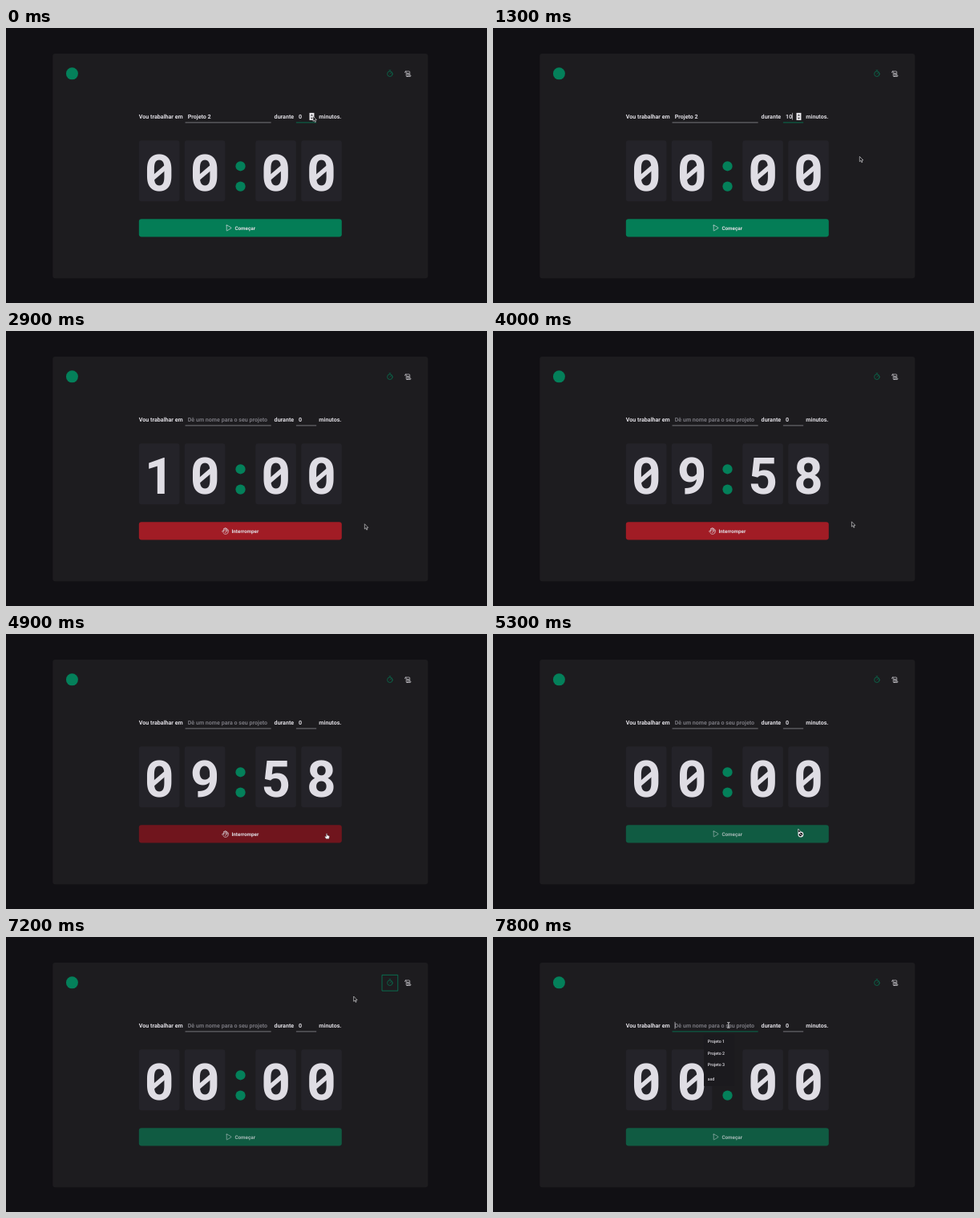
An HTML page that plays this animation: 600x343 px, repeating every 8000 ms.

```html
<!DOCTYPE html>
<html lang="pt-BR">
<head>
<meta charset="utf-8">
<title>Timer</title>
<style>
  html, body { margin: 0; width: 100%; height: 100%; overflow: hidden; background: #111014; }
  svg { display: block; width: 100%; height: 100%; }
  text { font-family: Roboto, Arial, sans-serif; white-space: pre; text-rendering: geometricPrecision; }
  .form { font-size: 18px; font-weight: 700; fill: #e0dee4; }
  .digit { font-size: 160px; font-weight: 700; fill: #dfdde4; text-anchor: middle; }
  .label { font-size: 16px; font-weight: 700; fill: #e0dee4; }
  .th { font-size: 14px; font-weight: 700; fill: #e0dee4; }
  .td { font-size: 14px; fill: #b9b7bf; }
  .option { font-size: 13.3px; font-weight: 500; fill: #e0dee4; }
  .icon { fill: none; stroke-width: 18; stroke-linecap: round; stroke-linejoin: round; }
  .hide { display: none; }
</style>
</head>
<body>
<svg viewBox="0 0 600 343">
  <rect width="600" height="343" fill="#111014"/>
  <!-- page layout in CSS pixels, scaled down to the stage -->
  <g transform="translate(58.3 31.95) scale(.3953)">
    <rect width="1184" height="709" rx="8" fill="#1d1c1f"/>
    <circle cx="61" cy="63" r="19" fill="#04805a"/>

    <g id="navTimer">
      <path class="frame" d="M1039 39h50v50h-50z" fill="none" stroke="#04805a" stroke-width="2"/>
      <path class="bar" d="M1040 85h48v3h-48z" fill="#04805a"/>
      <g class="icon" transform="translate(1052 52) scale(.09375)">
        <circle cx="128" cy="128" r="88"/><path d="M128 128L168 88M104 8h48"/>
      </g>
    </g>
    <g id="navHistory">
      <path class="frame" d="M1095 39h50v50h-50z" fill="none" stroke="#04805a" stroke-width="2"/>
      <path class="bar" d="M1096 85h48v3h-48z" fill="#04805a"/>
      <g class="icon" transform="translate(1108 52) scale(.09375)">
        <path d="M40 88A24 24 0 1 1 80 64V192a24 24 0 0 0 48 0q0-10-8-16H224q8 6 8 16a24 24 0 0 1-24 24H104M56 40H176a24 24 0 0 1 24 24V176M112 104h56M112 136h56"/>
      </g>
    </g>

    <g id="timerPage">
      <text class="form" x="272" y="205.500">Vou trabalhar em</text>
      <text class="form" x="699" y="205.500">durante</text>
      <text class="form" x="840" y="205.500">minutos.</text>
      <text class="form" x="426" y="205.500" id="task"></text>
      <text class="form" x="776" y="205.500" id="minutes"></text>
      <rect x="418" y="216.500" width="271" height="2" id="taskLine"/>
      <rect x="768" y="216.500" width="64" height="2" id="minutesLine"/>
      <rect y="187" width="1.6" height="22" fill="#e0dee4" id="caret"/>
      <g id="spinner">
        <rect x="810" y="187" width="15" height="23" fill="#e9e8ec"/>
        <path d="M813.500 196h8l-4-5zM813.500 202h8l-4 5z" fill="#3a393d"/>
      </g>
      <g id="cards"></g>
      <g fill="#04805a"><circle cx="592.500" cy="355" r="15.500"/><circle cx="592.500" cy="419" r="15.500"/></g>
      <rect x="272" y="522" width="640" height="56" rx="8" id="button"/>
      <g id="start">
        <path class="icon" stroke="#e0dee4" transform="translate(542 538) scale(.09375)" d="M72 40V216q2 10 12 7L228 135q6-7 0-14L84 33q-9-3-12 7Z"/>
        <text class="label" x="574.500" y="556">Começar</text>
      </g>
      <g id="stop">
        <path class="icon" stroke="#e0dee4" transform="translate(532 538) scale(.09375)" d="M76 128V64a20 20 0 0 1 40 0V44a20 20 0 0 1 40 0V64a20 20 0 0 1 40 0V104a20 20 0 0 1 40 0V144a92 92 0 0 1-172 46L30 148a20 20 0 0 1 34-20L76 150V128M116 64v52M156 64v52M196 104v20M132 184a40 40 0 0 1 40-40h24"/>
        <text class="label" x="564.500" y="556">Interromper</text>
      </g>
      <g id="options">
        <rect x="518" y="226" width="96" height="164" rx="3" fill="#1b1a1e"/>
        <text class="option" x="530" y="254">Projeto 1</text>
        <text class="option" x="530" y="290">Projeto 2</text>
        <text class="option" x="530" y="326">Projeto 3</text>
        <text class="option" x="530" y="371">asd</text>
      </g>
    </g>

    <g id="historyPage">
      <text x="96" y="166" font-size="24" font-weight="700" fill="#e0dee4">Meu histórico</text>
      <path d="M96 258.400V212q0-8 8-8h976q8 0 8 8v46.400z" fill="#2d2c31"/>
      <path d="M96 262.400h992v54.400H96zM96 320.800h992v54.400H96z" fill="#242329"/>
      <g id="table"></g>
      <circle cx="947" cy="289.600" r="4" fill="#04805a"/>
      <circle cx="947" cy="348" r="4" fill="#a51d26"/>
    </g>
  </g>

  <g id="cursor">
    <g id="arrow" stroke="#e8e7ea" stroke-width=".6">
      <path d="M0 0V6.300L1.400 5 2.500 7.400 3.500 7 2.500 4.600H4.500Z" fill="#141317"/>
    </g>
    <path id="hand" d="M-.6 0Q0-.6.6 0V2L3 2.700Q3.600 3 3.400 4L2.900 6.400H-.8L-2.300 4Q-2.400 3-1.500 3.300L-.6 4Z" fill="#f3f2f5" stroke="#201f23" stroke-width=".3"/>
    <g id="ban" fill="none" stroke="#f0eff2">
      <path d="M0 0V5.500L1.300 4.500H4Z" fill="#141317" stroke-width=".6"/>
      <circle cx="3.200" cy="7" r="2.900" fill="#141317" stroke-width="1.100"/>
      <path d="M1.200 5L5.200 9" stroke-width="1"/>
    </g>
    <path id="beam" d="M-1.500-3.500Q0-3.500 0-2.700Q0-3.500 1.500-3.500M0-2.700V2.700M-1.500 3.500Q0 3.500 0 2.700Q0 3.500 1.500 3.500" fill="none" stroke="#e8e7ea" stroke-width=".9"/>
  </g>
</svg>

<script>
const LOOP = 8000, STEP = 100;
const GREEN = '#04805a', LIGHT = '#e0dee4', MUTED = '#77767d';
const $ = id => document.getElementById(id);
const show = (el, on) => el.classList.toggle('hide', !on);
const within = (t, from, to) => t >= from && t < to;

// Moments of each click
const START = 1900, STOP = 5100, HISTORY = 6000, BACK = 6900, FOCUS = 7600;

// Pointer path: time, x, y
const path = [
  [0, 383, 110], [300, 382, 109], [900, 383, 109], [1000, 388, 112],
  [1300, 457.3, 160.3], [1500, 455, 195], [1700, 410, 241], [1800, 376, 248],
  [2000, 347, 252], [2400, 350, 252], [2600, 425, 245], [2700, 446, 240],
  [3000, 448, 241], [3400, 448, 239], [3600, 447.4, 237.8], [4100, 447.4, 237.8],
  [4400, 455, 243], [4700, 446, 247], [4900, 400, 249], [5100, 381, 245],
  [5300, 380.7, 243], [5400, 390, 238], [5600, 504, 134], [5800, 508, 72],
  [6000, 501, 63], [6200, 499.5, 66.5], [6500, 500, 64], [6700, 484, 61],
  [6900, 479, 60], [7100, 478, 62], [7400, 345, 98], [7600, 295, 109],
  [7700, 293.8, 110], [8000, 293.8, 110]
];

const digits = [272, 416, 640, 784].map(x => {
  $('cards').insertAdjacentHTML('beforeend', `
    <rect x="${x}" y="274" width="128" height="192" rx="8" fill="#242329"/>
    <text class="digit" y="433"></text>
    <path d="M${x + 43} 394L${x + 85} 358" stroke="#dfdde4" stroke-width="14"/>`);
  const [text, slash] = [...$('cards').children].slice(-2);
  return { x: x + 64, text, slash };
});

const columns = [120, 607, 727, 943];
[
  ['Tarefa', 'Duração', 'Início', 'Status'],
  ['Projeto 1', '5 minutos', 'há 8 minutos', 'Concluído'],
  ['Projeto 2', '10 minutos', 'há menos de um minuto', 'Interrompido']
].forEach((row, r) => row.forEach((cell, c) => {
  const x = columns[c] + (r && c === 3 ? 16 : 0);
  const y = [236.2, 294.6, 353][r];
  $('table').insertAdjacentHTML('beforeend',
    `<text class="${r ? 'td' : 'th'}" x="${x}" y="${y}">${cell}</text>`);
}));

function pointerAt(t) {
  const i = Math.max(1, path.findIndex(p => p[0] > t));
  const [t0, x0, y0] = path[i - 1], [t1, x1, y1] = path[i];
  const k = (t - t0) / (t1 - t0);
  return { x: x0 + (x1 - x0) * k, y: y0 + (y1 - y0) * k };
}

function setClock(t) {
  const left = within(t, START, STOP) ? 600 - Math.max(0, Math.floor((t - 2000) / 1000)) : 0;
  const pad = n => String(n).padStart(2, '0');
  const value = pad(Math.floor(left / 60)) + pad(left % 60);
  digits.forEach(({ x, text, slash }, i) => {
    text.textContent = value[i];
    text.setAttribute('x', x);
    show(slash, value[i] === '0');
  });
}

function setNav(id, active, hovered, focused) {
  const nav = $(id);
  nav.querySelector('.icon').setAttribute('stroke', active ? GREEN : LIGHT);
  show(nav.querySelector('.bar'), hovered);
  show(nav.querySelector('.frame'), focused);
}

function setForm(t) {
  const editing = t < START, focused = t >= FOCUS;
  $('task').textContent = editing ? 'Projeto 2' : 'Dê um nome para o seu projeto';
  $('task').style.fill = editing ? LIGHT : MUTED;
  $('minutes').textContent = !editing || t < 300 ? '0' : t < 600 ? '5' : '10';
  $('taskLine').setAttribute('fill', focused ? GREEN : '#8d8c93');
  $('minutesLine').setAttribute('fill', editing ? GREEN : '#8d8c93');
  show($('spinner'), editing);
  show($('caret'), focused || within(t, 600, 1600) && t % 1000 < 600);
  $('caret').setAttribute('x', focused ? 426 : 797);
  show($('options'), t >= 7700);
}

function render(t) {
  const { x, y } = pointerAt(t);
  const over = (l, top, r, b) => x >= l && x <= r && y >= top && y <= b;
  const history = within(t, HISTORY, BACK);
  const running = within(t, START, STOP);
  const disabled = t >= STOP;
  const onButton = !history && over(166, 238, 419, 261);
  const onTimer = over(469.5, 47, 489, 67);
  const onHistory = over(491.5, 47, 511, 67);

  show($('timerPage'), !history);
  show($('historyPage'), history);
  setNav('navTimer', !history, onTimer, within(t, BACK, FOCUS));
  setNav('navHistory', history, onHistory, history);
  setClock(t);
  setForm(t);

  $('button').setAttribute('fill', disabled ? '#105b42'
    : running ? (onButton ? '#70151d' : '#a11c25')
    : onButton ? '#075a41' : '#047d56');
  show($('start'), !running);
  show($('stop'), running);
  $('start').setAttribute('opacity', disabled ? .7 : 1);

  const kind = onButton ? (disabled ? 'ban' : 'hand')
    : onTimer || onHistory ? 'hand'
    : !history && over(224, 102, 331, 118) ? 'beam' : 'arrow';
  for (const id of ['arrow', 'hand', 'ban', 'beam']) show($(id), id === kind);
  $('cursor').setAttribute('transform', `translate(${x} ${y})`);
}

const origin = performance.now();
function tick() {
  const t = (performance.now() - origin) % LOOP;
  render(Math.floor(t / STEP) * STEP);
  requestAnimationFrame(tick);
}
tick();
</script>
</body>
</html>
```
